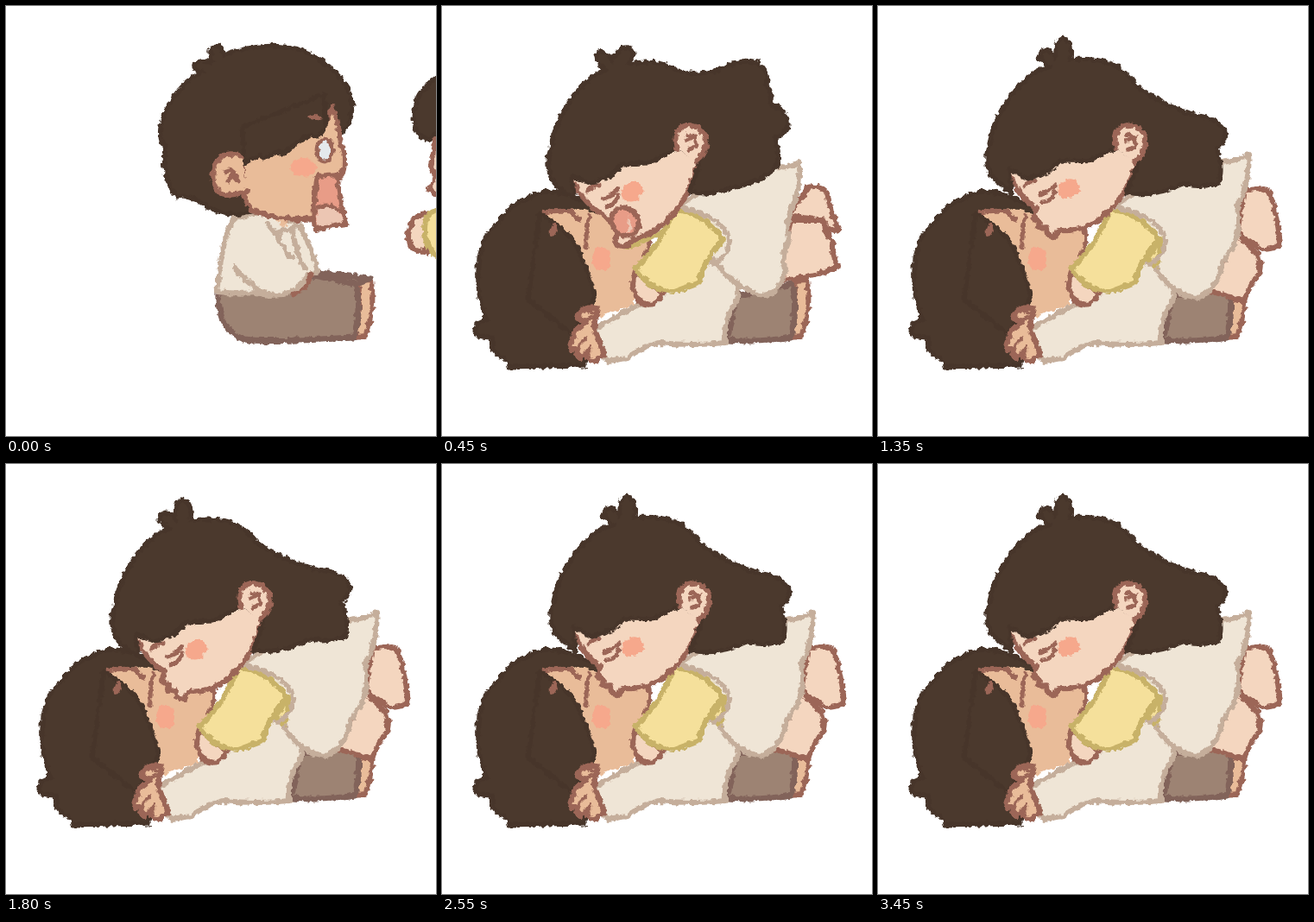
Animation, 498 px wide and 498 px high, one loop 3.6 s. Source, as an HTML page:

```html
<!DOCTYPE html>
<html lang="en">
<head>
<meta charset="utf-8">
<title>Hug and kiss</title>
<style>
  html, body { margin: 0; width: 100%; height: 100%; overflow: hidden; background: #fff; }
  svg { display: block; width: 498px; height: 498px; }
  path, ellipse { stroke-width: 6; stroke-linejoin: round; stroke-linecap: round; }
  .hair { fill: #4b392d; stroke: #47352a; stroke-width: 5; }
  .tan { fill: #e9bc99; stroke: #9c6657; }
  .peach { fill: #f4d6bf; stroke: #9c6657; }
  .cream { fill: #efe5d6; stroke: #c5ae9b; }
  .pants { fill: #9d8373; stroke: #82635a; stroke-width: 7; }
  .yellow { fill: #f5e09b; stroke: #c8b268; }
  .mouth { fill: #e89c87; stroke: #9c6657; }
  .blush { fill: #f6a88c; }
  .brow { fill: #9c6657; }
  .line { fill: none; stroke: #9c6657; stroke-width: 5; }
  .seam { fill: none; stroke: #c5ae9b; }
</style>
</head>
<body>
<svg viewBox="0 0 498 498">
  <defs>
    <filter id="crayon" filterUnits="userSpaceOnUse" x="0" y="0" width="498" height="498" color-interpolation-filters="sRGB">
      <feTurbulence type="fractalNoise" baseFrequency=".17" numOctaves="2" seed="4"/>
      <feDisplacementMap in="SourceGraphic" scale="7" xChannelSelector="R" yChannelSelector="G"/>
    </filter>
    <g id="foot"><path class="tan" d="M408 319L423 318Q428 350 416 382L404 383Q412 350 408 319Z"/></g>
  </defs>
  <g filter="url(#crayon)">

    <g id="sitting">
      <use href="#foot"/>
      <path class="pants" d="M352 314L362 309 422 316 406 322Z"/>
      <path class="pants" d="M246 332Q244 374 276 386Q300 390 403 384Q412 350 405 322L352 311 330 328Z"/>
      <path class="cream" d="M264 246Q252 262 244 331Q270 334 290 332Q300 336 320 334Q338 330 350 312L361 308Q352 272 338 252L300 238Z"/>
      <path class="tan" d="M312 248L328 246 322 257Z" stroke="none" style="stroke:none"/>
      <path class="seam" d="M265 302Q280 325 304 333M303 252Q312 266 316 262L334 256M314 264Q322 286 332 291M332 262Q336 284 346 304"/>
      <path class="line" d="M353 310Q350 328 332 335"/>
      <path class="hair" d="M198 221Q180 200 184 162Q174 150 182 130Q195 92 228 76Q214 74 219 67Q226 61 239 65Q234 50 240 47Q251 43 251 57Q290 42 330 48Q352 52 368 66Q396 85 401 112Q402 135 388 148L350 200 286 238Q264 246 240 236Q222 224 206 220Z"/>
      <path class="tan" d="M274 180L366 140 378 118Q386 135 388 160Q396 180 388 198L362 197 356 246Q318 250 286 237Q276 226 274 212Z"/>
      <path class="mouth" d="M361 197L384 195Q384 215 394 252Q376 254 358 259Q354 230 361 197Z"/>
      <path d="M360 232Q374 228 385 234L391 250 361 256Z" fill="#ecc6b3"/>
      <path class="line" d="M362 233Q374 228 385 236"/>
      <ellipse class="blush" cx="344" cy="187" rx="15" ry="11"/>
      <ellipse cx="369" cy="167" rx="9" ry="13" fill="#e4e9ec" stroke="#9c6657" style="stroke-width:5"/>
      <path class="hair" d="M276 182L274 140 368 102 370 128Q371 146 360 151L352 150 338 157 322 171 314 169 298 177 294 172Z"/>
      <ellipse class="brow" cx="358" cy="129" rx="8" ry="4" transform="rotate(12 358 129)"/>
      <path class="tan" d="M273 174Q252 166 243 182Q234 202 247 216Q260 222 279 214"/>
      <path class="line" d="M254 191Q266 187 263 199M258 203L263 195 269 203"/>
    </g>

    <g id="arriving">
      <path class="hair" d="M505 78Q472 98 472 130Q474 152 490 155L505 140Z"/>
      <path class="peach" d="M505 152L497 154Q496 172 492 186L498 198 490 212 505 224Z"/>
      <path class="peach" d="M488 242Q470 238 466 265Q466 286 488 285Z"/>
      <path class="yellow" d="M505 236Q484 236 485 262Q487 286 505 292Z"/>
    </g>

    <g id="lying">
      <use href="#foot"/>
      <path class="pants" d="M340 336L330 387Q370 390 404 384Q412 350 406 322Z"/>
      <path class="cream" d="M176 374L225 347 250 340 290 290 326 300Q350 330 341 342Q326 362 328 390Q290 394 252 390Q228 396 215 408L191 411Q184 390 176 374Z"/>
      <path class="hair" d="M165 416L78 418Q78 410 66 405Q55 398 58 384Q40 384 38 376Q38 366 52 364Q38 335 43 292Q48 262 66 250Q78 230 104 220Q122 210 150 220L200 240 178 346Z"/>
      <path class="tan" d="M118 239Q140 234 165 236L240 258Q244 280 224 306L222 346 178 362Q178 330 160 288Q148 262 118 239Z" style="stroke:none"/>
      <path class="line" d="M118 239Q134 236 150 238L160 248M240 260Q243 278 234 290M171 242Q166 262 167 280"/>
      <path class="hair" d="M113 240Q152 262 160 288Q172 315 177 335L172 348 150 380 100 340Z"/>
      <ellipse class="brow" cx="129" cy="259" rx="4" ry="8" transform="rotate(15 129 259)"/>
      <ellipse class="blush" cx="185" cy="293" rx="11" ry="14"/>
      <path class="tan" d="M180 350Q162 346 157 362L167 366Q150 376 153 384Q145 394 151 398L158 396Q154 406 160 407L168 401Q168 412 178 411L188 404 176 372Z"/>
      <path class="line" d="M166 352L176 356M164 364L182 358M158 394L166 386M168 402L173 394" style="stroke-width:4"/>
    </g>

    <g id="girl">
      <g id="jumpBody">
        <path class="peach" d="M402 242L424 210Q438 206 446 216Q450 240 460 260Q450 264 440 249Z"/>
        <path class="peach" d="M404 248L440 248Q446 264 453 276Q452 290 458 302Q440 312 388 318Z"/>
        <path class="cream" d="M272 234L300 214 350 200 390 186Q404 188 414 181Q416 212 403 240Q398 252 402 270Q392 290 398 305Q390 334 372 336Q338 326 314 294Z"/>
      </g>
      <g id="restBody">
        <path class="peach" d="M424 214Q440 208 452 214Q460 230 466 274Q462 282 444 282L416 262Z"/>
        <path class="peach" d="M416 264L436 284Q446 296 441 310Q430 324 424 342L384 330Z"/>
        <path class="cream" d="M272 234L300 214 350 200 395 181Q414 180 429 172Q432 200 416 232Q420 262 410 282Q398 295 396 310Q386 332 370 338Q340 334 322 304L312 294Z"/>
        <path class="yellow" d="M327 270Q328 290 320 302L312 292Z"/>
      </g>
      <path class="peach" d="M224 308Q216 328 230 343Q248 352 256 332Z"/>
      <path class="yellow" d="M268 235Q256 274 224 304Q238 328 268 331L298 320Q300 300 326 270Q304 240 268 235Z"/>
      <path class="seam" d="M272 232Q332 246 333 274Q330 290 316 298" style="stroke-width:5"/>
      <g id="head">
        <g id="jumpFace">
          <path d="M203 274Q212 282 222 276L256 262" class="yellow" style="fill:none"/>
          <path class="peach" d="M149 198Q164 230 190 244L204 262 200 274Q212 284 222 270Q250 264 270 238Q290 212 298 178L272 150 170 180Z"/>
          <ellipse class="mouth" cx="212" cy="250" rx="15" ry="17" transform="rotate(-30 212 250)"/>
          <path d="M216 244L222 258 214 263Z" fill="#ecc6b3"/>
        </g>
        <path id="kissFace" class="peach" d="M149 198Q164 230 184 240L180 250 188 256 187 263 196 262 198 270 207 272 210 264Q246 264 268 238Q290 212 298 178L272 150 170 180Z"/>
        <ellipse class="blush" cx="220" cy="215" rx="13" ry="11" transform="rotate(-30 220 215)"/>
        <path class="line" d="M168 215Q174 207 182 208M187 223Q198 220 204 211M190 232Q202 230 204 219"/>
        <path id="jumpHair" class="hair" d="M130 206Q118 185 126 165Q130 130 160 95Q175 78 190 74Q178 68 179 56Q186 48 197 63Q206 46 216 48Q226 54 216 67Q245 62 264 70Q285 84 320 74Q345 60 365 66Q380 76 376 92Q384 102 380 114Q402 120 400 138Q398 150 386 152Q392 175 388 186Q370 205 330 212Q310 220 286 215Q296 195 298 178L274 164 240 182 208 183 196 196 172 206 150 196 154 224Z"/>
        <path id="restHair" class="hair" d="M130 206Q118 185 126 165Q130 130 160 95Q175 78 190 75Q176 68 178 60Q186 50 197 65Q194 44 204 42Q216 42 214 65Q245 62 262 68Q280 76 292 92Q330 118 375 124Q398 132 398 144Q398 154 388 159Q398 180 393 200Q375 206 350 203Q320 220 286 216Q296 195 298 178L274 164 240 182 208 183 196 196 172 206 150 196 154 224Z"/>
        <path class="peach" d="M272 165Q266 142 284 138Q304 138 306 158Q304 174 294 180"/>
        <path class="line" d="M284 149Q294 152 284 156M293 151Q297 164 286 166"/>
      </g>
    </g>
  </g>
</svg>
<script>
const STEP = 150, STEPS = 24;
const $ = id => document.getElementById(id);
const show = (on, ...ids) => ids.forEach(id => $(id).style.display = on ? '' : 'none');

// Lean of the boy and offset of the girl while she leaps in.
const lean = [0, -3, -7];
const leap = [[0, 0], [235, -23], [150, -46]];

function draw(step) {
  const flying = step < 3, kissing = step > 3;
  show(flying, 'sitting');
  show(step === 0, 'arriving');
  show(!flying, 'lying');
  show(step > 0, 'girl');
  show(!kissing, 'jumpBody', 'jumpFace', 'jumpHair');
  show(kissing, 'restBody', 'kissFace', 'restHair');
  $('sitting').setAttribute('transform', `rotate(${lean[step] || 0} 300 370)`);
  $('girl').setAttribute('transform', `translate(${leap[step] || [0, 0]})`);
  $('head').setAttribute('transform', `rotate(${kissing && step % 2 ? 3 : 0} 285 235)`);
}

let last = -1;
function tick() {
  const step = Math.floor(performance.now() / STEP) % STEPS;
  if (step !== last) draw(last = step);
  requestAnimationFrame(tick);
}
tick();
</script>
</body>
</html>
```
